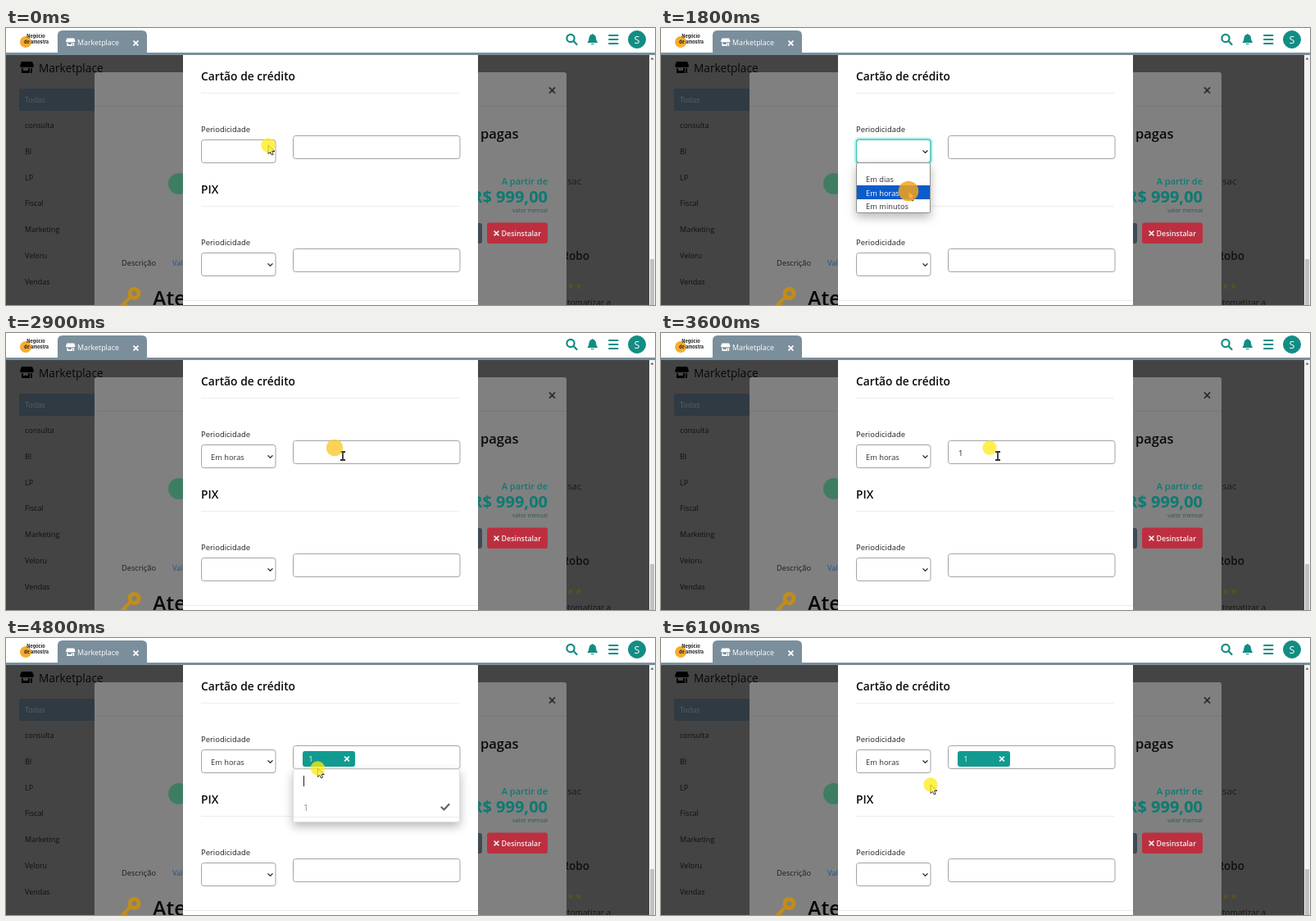
Recreate the animation shown at these times as an HTML page. Size 792x338 px, loop 6300 ms.

```html
<!DOCTYPE html>
<html lang="pt">
<head>
<meta charset="utf-8">
<title>Marketplace</title>
<style>
  html, body { margin: 0; width: 100%; height: 100%; overflow: hidden; background: #fff; }
  svg { display: block; width: 792px; height: 338px; font-family: "Open Sans", "Noto Sans", sans-serif; }
  .head { font-size: 13.8px; font-weight: 600; fill: #0c0c0c; }
  .label { font-size: 9.45px; fill: #222; }
  .item { font-size: 9.3px; fill: #333; }
  .side { font-size: 9px; fill: #101010; }
  .field { fill: #fff; stroke: #a3a3a3; }
  .rule { stroke: #ececec; }
  .line { fill: none; stroke-linecap: round; stroke-linejoin: round; }
  .caret { stroke: #222; }
  .end { text-anchor: end; }
</style>
</head>
<body>
<svg viewBox="0 0 792 338">
  <defs>
    <filter id="soft" x="-40%" y="-40%" width="180%" height="200%">
      <feDropShadow dx="0" dy="5" stdDeviation="6" flood-opacity=".28"/>
    </filter>
    <filter id="glow" x="-10%" y="-30%" width="120%" height="160%">
      <feGaussianBlur stdDeviation=".8"/>
    </filter>
    <linearGradient id="keyFace" x2="1" y2="1">
      <stop stop-color="#3e3838"/>
      <stop offset="1" stop-color="#2a2525"/>
    </linearGradient>
    <g id="store">
      <path d="M2 0H15L17 5Q17 7 15 7H2Q0 7 0 5Z"/>
      <path d="M2 8H4V11H10V8H12V14H2ZM13 8H15V14H13Z"/>
    </g>
    <path id="cross" class="line" d="M-2.4-2.4 2.4 2.4M2.4-2.4-2.4 2.4"/>
    <path id="chevron" class="line" d="M-2.6-1.3 0 1.4 2.6-1.3" stroke="#333" stroke-width="1.3"/>
  </defs>

  <!-- dimmed page -->
  <rect width="792" height="338" fill="#444"/>
  <use href="#store" x="17" y="41"/>
  <text x="40" y="53.5" font-size="13.7" font-weight="500" fill="#080808">Marketplace</text>
  <rect x="16" y="74" width="100" height="27" rx="2" fill="#303a43"/>
  <text x="23" y="91" class="side" style="fill:#56606a">Todas</text>
  <g id="sidebar"></g>
  <text x="685" y="191" font-size="11.5" fill="#1c1c1c">sac</text>
  <text x="712" y="283" class="end" font-size="13.5" font-weight="600" fill="#101010">Robo</text>
  <text x="684" y="319" font-size="11" fill="#5c5020">★★</text>
  <text x="738" y="339" class="end" font-size="10" fill="#141414">Automatizar a</text>

  <!-- dimmed product dialog -->
  <path d="M108 338V57Q108 54 111 54H681Q684 54 684 57V338Z" fill="#808080"/>
  <path d="M108 95.5H684" stroke="#787878"/>
  <use href="#cross" transform="translate(666.5 76) scale(1.3)" stroke="#2c2c2c" stroke-width="1.3"/>
  <circle cx="211" cy="190" r="13" fill="#3f7d62"/>
  <text x="579" y="134.500" font-size="16.5" font-weight="600" fill="#0a0a0a">pagas</text>
  <g fill="#0d7a72" class="end">
    <text x="661" y="191" font-size="11" font-weight="600">A partir de</text>
    <text x="661" y="213" font-size="20" font-weight="700">R$ 999,00</text>
    <text x="661" y="225" font-size="7.2" fill="#2f5552">valor mensal</text>
  </g>
  <rect x="540" y="238" width="41" height="25" rx="3" fill="#3f4a54"/>
  <rect x="587" y="237.500" width="74" height="25.500" rx="3" fill="#bd2f40"/>
  <use href="#cross" x="598.500" y="250.500" stroke="#eee" stroke-width="1.7"/>
  <text x="653" y="254" class="end" font-size="8.9" font-weight="600" fill="#eee">Desinstalar</text>
  <text x="141" y="290" font-size="9.25" fill="#1c1c1c">Descrição</text>
  <text x="203" y="290" font-size="9.25" fill="#234f96">Valores</text>
  <g class="line" stroke="#c08d1c">
    <circle cx="156.500" cy="324" r="5.500" stroke-width="5"/>
    <path d="M151 329 139 341M144 336l4 4" stroke-width="4"/>
  </g>
  <text x="179" y="338.500" font-size="25" font-weight="600" fill="#080808">Atendimento</text>

  <!-- enter key -->
  <g id="enterKey">
    <path d="M128 225H186Q189 225 189 229L190 309Q190 313 186 313H139Q135 313 135 309L137 271H130Q126 271 126 267L124 229Q124 225 128 225Z" fill="#1d1919"/>
    <path d="M136 300 140 312H186L189 304 184 296Z" fill="#6d6464"/>
    <path d="M126 262 130 270H138L141 262Z" fill="#6d6464"/>
    <path d="M131 228H181Q184 228 184 231L185 300Q185 303 182 303H144Q141 303 141 300L142 264H131Q128 264 128 261V231Q128 228 131 228Z" fill="url(#keyFace)" stroke="#554d4d" stroke-width=".8"/>
    <text x="138" y="248" font-size="8.6" fill="#fff">Enter</text>
    <path d="M175.500 240V245.500H163M166.500 242 162.500 245.500 166.500 249" class="line" stroke="#fff" stroke-width="1.7"/>
  </g>

  <!-- front form -->
  <rect x="216" y="30" width="360" height="310" fill="#fff"/>
  <text x="238" y="64" class="head">Cartão de crédito</text>
  <text x="238" y="202" class="head">PIX</text>
  <path class="rule" d="M238 79.500H553M238 217.500H553M216 332.500H576"/>
  <g id="fields"></g>
  <g id="focus" fill="none">
    <rect x="237.500" y="135" width="92.500" height="30.500" rx="4" stroke="#8fe6df" stroke-width="2" filter="url(#glow)"/>
    <rect x="238.500" y="136" width="90.500" height="28.500" rx="3" stroke="#3cc4bb" stroke-width="1.2"/>
  </g>
  <text id="chosen" x="250" y="154.500" class="item">Em horas</text>

  <text id="typed" x="363" y="149.500" font-size="9.5" fill="#222">1</text>
  <path id="caret" class="caret" d="M368.500 138V152"/>

  <g id="options">
    <rect x="238.500" y="164.500" width="90" height="61" rx="2" fill="#fff" stroke="#8f8f8f" filter="url(#soft)"/>
    <rect id="hover" x="239" width="89" fill="#0b5ccb"/>
    <text x="250" y="187.500" class="item">Em dias</text>
    <text x="250" y="204.500" class="item">Em horas</text>
    <text x="250" y="221" class="item">Em minutos</text>
  </g>

  <g id="results">
    <rect x="350.500" y="160" width="203" height="64.500" rx="2" fill="#fff" stroke="#ddd" filter="url(#soft)"/>
    <text x="363" y="211" font-size="10.500" fill="#888">1</text>
    <path d="M531.500 206.500 534.500 209.500 540.500 203" class="line" stroke="#666" stroke-width="2.300"/>
    <path class="rule" d="M351 218.500H553"/>
    <path id="searchCaret" class="caret" d="M363.500 168V181"/>
  </g>
  <g id="tag">
    <rect x="362" y="138" width="64" height="19" rx="3" fill="#119b90"/>
    <text x="369.500" y="150.500" font-size="8.500" fill="#fff">1</text>
    <use href="#cross" x="416" y="147.500" stroke="#fff" stroke-width="1.700"/>
  </g>

  <!-- header -->
  <rect width="792" height="30" fill="#fff"/>
  <path d="M0 30H63V9Q63 3 69 3H166Q172 3 172 9V30H792V33H0Z" fill="#7b8e9c"/>
  <circle cx="24" cy="17" r="7" fill="#f7ac2f"/>
  <g font-family="Inter, sans-serif" font-size="5.500" font-weight="700" text-anchor="middle" fill="#222">
    <text x="36.500" y="11.500">Negócio</text>
    <text x="37" y="19">de amostra</text>
  </g>
  <use href="#store" transform="translate(73 12.500) scale(.68)" fill="#fff"/>
  <text x="87" y="21" font-size="8.900" fill="#fff">Marketplace</text>
  <use href="#cross" x="158.500" y="18.500" stroke="#fff" stroke-width="2"/>
  <g stroke="#128d83" fill="#128d83">
    <g class="line" stroke-width="2.200">
      <circle cx="689" cy="12.500" r="4.600"/>
      <path d="M692.600 16 696.500 20"/>
      <path d="M736 9H746.500M736 14H746.500M736 19H746.500" stroke-width="2"/>
    </g>
    <path d="M710 17.500Q712 15.500 712 12 712 8.500 715.700 8 719.500 8.500 719.500 12 719.500 15.500 721.500 17.500ZM714 19.500H717.500M715.700 7V8"/>
    <circle cx="770" cy="14" r="10.500"/>
  </g>
  <text x="770" y="18.500" font-size="12.500" text-anchor="middle" fill="#fff">S</text>

  <!-- scroll bar -->
  <rect x="785" y="33" width="7" height="305" fill="#f3f3f3"/>
  <rect x="786" y="282" width="5" height="56" fill="#c1c1c1"/>
  <path d="M786.500 38.500 788.500 36 790.500 38.500Z" fill="#555"/>

  <g id="pointer">
    <g id="arrow"><path d="M0 0V10.500L2.500 8.300 4.300 12 6.200 11.200 4.500 7.500H8Z" fill="#fff" stroke="#222" stroke-width=".9"/></g>
    <g id="beam"><path d="M7 5H13M10 5V15M7 15H13" stroke="#333" stroke-width="1.800" fill="none"/></g>
    <g id="hand"><path d="M2 1Q3.500 0 4 1.500V5L9 6Q10.500 7 10 9L8.500 12.500H3.500L.5 8Q.5 6.500 2 7Z" fill="#fff" stroke="#222"/></g>
    <circle id="halo"/>
  </g>
</svg>
<script>
const LOOP = 6300, STEP = 100;
const el = id => document.getElementById(id);
const show = (id, on) => el(id).setAttribute("opacity", Number(on));
const set = (id, attrs) => Object.entries(attrs).forEach(([k, v]) => el(id).setAttribute(k, v));
const within = (t, from, to) => t >= from && t < to;
const ramp = (t, from, to) => Math.min(1, Math.max(0, (t - from) / (to - from)));

el("sidebar").innerHTML = ["consulta", "BI", "LP", "Fiscal", "Marketing", "Veloru", "Vendas"]
  .map((name, i) => `<text x="23" y="${122.3 + i * 31.7}" class="side">${name}</text>`).join("");

el("fields").innerHTML = [0, 138].map(dy => `<g transform="translate(0 ${dy})">
  <text x="238" y="127" class="label">Periodicidade</text>
  <rect x="238.5" y="136.5" width="90.500" height="28" rx="3" class="field"/>
  <use href="#chevron" x="322.500" y="151"/>
  <rect x="350.5" y="131.5" width="203.500" height="28" rx="3" class="field"/></g>`).join("");

// time, x, y of the pointer hot spot
const path = [
  [0, 320, 143], [700, 320, 143], [800, 312, 154], [1300, 302, 199], [2000, 302, 199],
  [2400, 399, 161], [2600, 401, 140], [3800, 401, 140], [4100, 406, 149],
  [4700, 406, 149], [5000, 329, 179], [LOOP, 329, 179]
];
const clicks = [[100, 300], [1800, 2000], [2600, 2900], [5100, 5400]];
const optionRows = [[165, 10.5], [176, 16], [192, 17]];

function pointerAt(t) {
  const i = path.findIndex(p => p[0] > t);
  const [a, b] = [path[i - 1], path[i]];
  const k = ramp(t, a[0], b[0]);
  return [a[1] + (b[1] - a[1]) * k, a[2] + (b[2] - a[2]) * k];
}

function drawPointer(t, x, y) {
  const kind = within(t, 2500, 4000) ? "beam" : within(t, 4000, 4800) ? "hand" : "arrow";
  for (const id of ["arrow", "beam", "hand"]) show(id, id === kind);
  set("pointer", { transform: `translate(${x} ${y})` });
  const pressed = clicks.some(([from, to]) => within(t, from, to));
  const released = clicks.some(([, to]) => within(t, to, to + STEP));
  set("halo", {
    r: pressed ? 12.3 : released ? 10.3 : 8.7,
    fill: pressed ? "#f5a31c" : released ? "#fac51c" : "#ffeb14",
    "fill-opacity": pressed ? 0.85 : 0.75
  });
}

function drawOptions(t, y) {
  const row = y < 176 ? 0 : y < 192.5 ? 1 : 2;
  set("hover", { y: optionRows[row][0], height: optionRows[row][1] });
  el("options").querySelectorAll("text").forEach((node, i) => {
    node.style.fill = i + 1 === row ? "#fff" : "";
  });
  show("options", within(t, 300, 2000));
}

function render(t) {
  const [x, y] = pointerAt(t);
  drawPointer(t, x, y);
  drawOptions(t, y);
  show("focus", within(t, 200, 2700));
  show("chosen", t >= 2000);
  show("typed", within(t, 3100, 4000));
  show("caret", within(t, 3100, 3600));
  show("tag", t >= 4000);
  show("results", ramp(t, 3900, 4100) * (1 - ramp(t, 5100, 5300)));
  show("searchCaret", within(t, 4400, 4900));
  show("enterKey", ramp(t, 3700, 3900) * (1 - ramp(t, 4600, 4800)));
}

function tick() {
  const t = performance.now() % LOOP;
  render(Math.floor(t / STEP) * STEP);
  requestAnimationFrame(tick);
}
tick();
</script>
</body>
</html>
```
